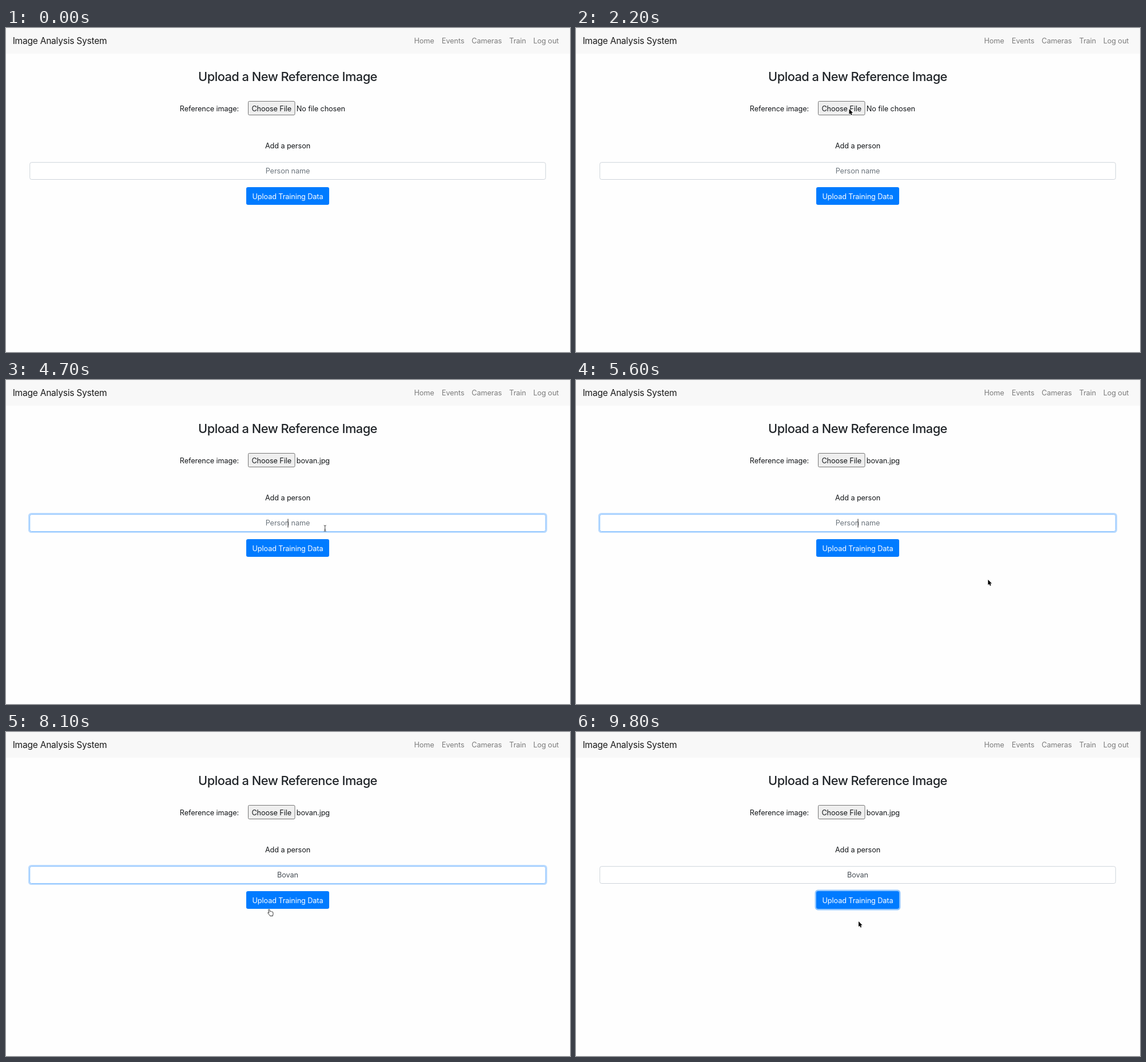
Write an HTML page that moves like this. It is 986 px wide and 568 px high and loops after 9900 ms.

```html
<!DOCTYPE html>
<html lang="en">
<head>
<meta charset="utf-8">
<title>Upload a New Reference Image</title>
<style>
  html, body { margin: 0; width: 100%; height: 100%; overflow: hidden; background: #fefefe; }
  svg { display: block; width: 986px; height: 568px; }
  text {
    font: 400 12.7px Inter, "Liberation Sans", sans-serif;
    font-optical-sizing: none;
    letter-spacing: -.1px;
    text-anchor: middle;
    fill: #15181b;
  }
  #brand { font-size: 15.5px; letter-spacing: -.22px; fill: #1a1a1a; }
  #title { font-size: 21.8px; font-weight: 500; letter-spacing: -.52px; fill: #212529; }
  #nav text { fill: #7c7c7c; }
  #file { text-anchor: start; }
  #send text { fill: #fff; }
  .ring { fill: none; stroke-width: 2.6; }
</style>
</head>
<body>
<svg viewBox="0 0 986 568">
  <rect width="986" height="568" fill="#fefefe"/>
  <rect width="986" height="45" fill="#f8f8f8"/>
  <text id="brand" x="94" y="28">Image Analysis System</text>
  <g id="nav">
    <text x="731" y="26.8">Home</text>
    <text x="781.5" y="26.8">Events</text>
    <text x="840.5" y="26.8">Cameras</text>
    <text x="894.5" y="26.8">Train</text>
    <text x="944" y="26.8">Log out</text>
  </g>

  <text id="title" x="492.5" y="93.2">Upload a New Reference Image</text>

  <text x="355.5" y="145.5">Reference image:</text>
  <rect x="423.5" y="128.5" width="81.5" height="24" rx="2" fill="#efefef" stroke="#767676"/>
  <text x="464.2" y="145.5">Choose File</text>
  <text id="file" x="507.8" y="145.5"></text>

  <text x="492.5" y="210.6">Add a person</text>

  <rect id="inputRing" class="ring" x="40.2" y="234.2" width="904.6" height="32.6" rx="4" stroke="#007bff"/>
  <rect id="input" x="41.7" y="235.7" width="901.6" height="29.8" rx="3" fill="#fff"/>
  <text id="name" x="492.5" y="255.4"></text>
  <rect id="caret" y="243.5" width="1" height="15" fill="#222"/>

  <g id="send">
    <rect id="sendRing" class="ring" x="418.9" y="277.9" width="147.2" height="33.2" rx="4" stroke="#268fff"/>
    <rect id="sendBox" x="420" y="279" width="145" height="31" rx="3.2"/>
    <text x="492.5" y="299.5">Upload Training Data</text>
  </g>

  <g id="arrow">
    <path d="M0 0V9.2L2.1 7.4 3.5 10.7 5.2 10 3.8 6.8H6.6Z" fill="#000"
          stroke="#fff" stroke-width="1.4" paint-order="stroke" stroke-linejoin="round"/>
  </g>
  <g id="beam">
    <path d="M-2-5.2Q0-5.2 0-3.8Q0-5.2 2-5.2M0-4V4M-2 5.2Q0 5.2 0 3.8Q0 5.2 2 5.2M-1.2 2H1.2"
          fill="none" stroke="#333" stroke-width=".9"/>
  </g>
  <g id="hand">
    <path d="M2.2.8c.7-.5 1.5-.1 1.7.7l.8 3c.5-.6 1.4-.5 1.7.2.5-.5 1.4-.4 1.7.3.6-.4 1.4-.1 1.5.6l.4 2.4c.2 1.2-.3 2-.6 2.8v1.4H4.6c-.4-1.4-1.8-2.4-2.6-3.6C1.2 7.5.4 6.9.8 6.4c.4-.6 1.4-.2 2.1.6L1.8 2C1.7 1.5 1.8 1 2.2.8Z"
          fill="#fff" stroke="#222" stroke-width=".9" stroke-linejoin="round"/>
  </g>
</svg>
<script>
const LOOP = 9900;
const BLUE = '#007bff', MID = '#0072ec', DARK = '#0069d9';
const $ = id => document.getElementById(id);
const cursor = (kind, x, y) => ({ kind, x, y });

const start = {
  kind: '', x: 0, y: 0,
  file: 'No file chosen', name: '', caret: 0,
  focus: 0, ring: 0, fill: BLUE
};

// Each step overrides part of the state from its time on.
const steps = [
  [0, start],
  [1000, cursor('arrow', 560, 215)],
  [1200, cursor('arrow', 530, 185)],
  [1500, cursor('arrow', 500, 158)],
  [1600, cursor('arrow', 482, 146)],
  [2200, cursor('arrow', 477.5, 142)],
  [4000, { ...cursor('arrow', 735, 332), file: 'bovan.jpg' }],
  [4500, cursor('arrow', 650, 296)],
  [4600, { ...cursor('beam', 575, 262), focus: .6, caret: 1 }],
  [4700, { ...cursor('beam', 557.7, 260), focus: 1 }],
  [5000, cursor('arrow', 650, 312)],
  [5100, { ...cursor('arrow', 720.3, 350), caret: 0 }],
  [5600, { caret: 1 }],
  [6100, { name: 'B' }],
  [6500, { name: 'Bov' }],
  [6900, { name: 'Bovan' }],
  [7400, { ...cursor('arrow', 600, 345), caret: 0 }],
  [7900, cursor('arrow', 480, 333)],
  [8100, cursor('hand', 457, 310.3)],
  [8200, { ...cursor('hand', 456.5, 306), fill: MID }],
  [8300, { ...cursor('hand', 456.5, 304), fill: DARK }],
  [8400, { focus: .5, ring: .5 }],
  [8500, { focus: 0, ring: 1 }],
  [9700, { ...cursor('arrow', 478, 318), fill: MID }],
  [9800, { ...cursor('arrow', 494, 332), fill: BLUE }]
];

function stateAt(t) {
  return Object.assign({}, ...steps.filter(([at]) => at <= t).map(([, change]) => change));
}

function draw(s) {
  $('file').textContent = s.file;
  $('name').textContent = s.name || 'Person name';
  $('name').style.fill = s.name ? '#495057' : '#6c757d';

  const typed = s.name ? $('name').getComputedTextLength() : 0;
  $('caret').setAttribute('x', 492.5 + typed / 2);
  $('caret').style.opacity = s.caret;

  $('input').style.stroke = s.focus ? '#80bdff' : '#ced4da';
  $('inputRing').style.opacity = s.focus * .27;
  $('sendRing').style.opacity = s.ring * .5;
  $('sendBox').style.fill = s.fill;

  for (const kind of ['arrow', 'beam', 'hand']) {
    $(kind).style.display = kind === s.kind ? '' : 'none';
    $(kind).setAttribute('transform', `translate(${s.x} ${s.y})`);
  }
}

let origin;
function tick(now) {
  origin ??= now;
  draw(stateAt((now - origin) % LOOP));
  requestAnimationFrame(tick);
}
draw(start);
requestAnimationFrame(tick);
</script>
</body>
</html>
```
